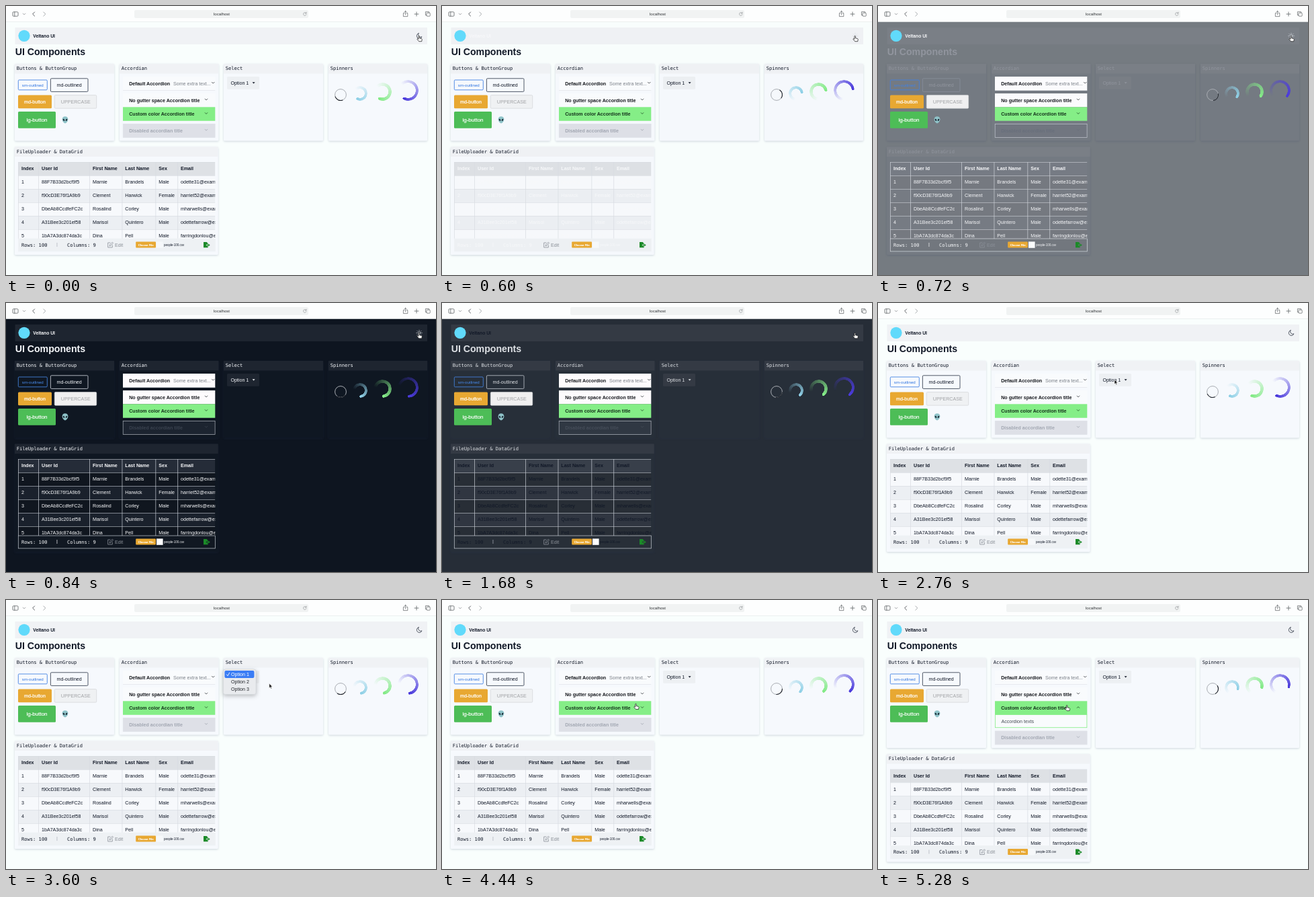
An HTML page for the animation above (5400 ms loop, 640x400 px).

```html
<!DOCTYPE html>
<html lang="en">
<head>
<meta charset="utf-8">
<title>UI Components</title>
<style>
html, body { margin: 0; width: 100%; height: 100%; overflow: hidden; }
#stage { position: relative; width: 640px; height: 400px; overflow: hidden; }
svg { position: absolute; left: 0; top: 0; font-family: "Liberation Sans", Arial, sans-serif; font-size: 7.11px; }
text { white-space: pre; }
.b { font-weight: bold; }
.mono { font-family: "DejaVu Sans Mono", monospace; font-size: 7.1px; }
.med { stroke: currentColor; stroke-width: .2px; fill: currentColor; }
.line { fill: none; stroke-linecap: round; stroke-linejoin: round; }
.card { fill: var(--card); filter: drop-shadow(0 1px 1.5px rgba(40, 55, 95, .2)); }
.spin { position: absolute; border-radius: 50%; }
</style>
</head>
<body>
<div id="stage"><svg id="svg" width="640" height="400" viewBox="0 0 640 400"></svg></div>
<script>
const LOOP = 5400, STEP = 120, GROW = 19.5;
const stage = document.getElementById('stage');
const svg = document.getElementById('svg');
const $ = id => document.getElementById(id);

// [light, dark]; the first group fades, the second switches at once
const fading = {
  page: ['#f9fefd', '#0e1520'], card: ['#f6f9fd', '#0f1722'], bar: ['#f0f2f5', '#1e2530'],
  ink: ['#111827', '#f5f7fa'], edge: ['#273142', '#d5dae2'], blue: ['#2f74e0', '#4a8df0'],
  acc: ['#f9fbfd', '#fdfbfd'], off: ['#dee0e7', '#1c2430'], offLine: ['#dee0e7', '#aeb4bd'],
  offInk: ['#a3a8b3', '#3a424f'], upper: ['#eff1f3', '#f0f0f0'], head: ['#dee1e5', '#252c38'],
  odd: ['#f7f9fc', '#10161f'], even: ['#eceff3', '#1a212c'], rule: ['#d8dbe1', '#c4c9d1'],
  foot: ['#eef1f4', '#111822'], footLine: ['#eef1f4', '#c4c9d1'], pick: ['#f6f8fa', '#ffffff'],
  sel: ['#edf0f3', '#1e2530'], track: ['#a9adb3', '#a9adb3']
};
const instant = {
  text: ['#111827', '#f7f8fa'], sep: ['#aab0b8', '#f7f8fa'], edit: ['#8b9098', '#8b9098'],
  icon: ['#303846', '#d9dde3']
};

const rect = (x, y, w, h, fill, more = '') =>
  `<rect x="${x}" y="${y}" width="${w}" height="${h}" fill="${fill}" ${more}/>`;
const text = (x, y, s, fill, more = '') => `<text x="${x}" y="${y}" fill="${fill}" ${more}>${s}</text>`;
const line = (d, stroke, w = .8, more = '') =>
  `<path class="line" d="${d}" stroke="${stroke}" stroke-width="${w}" ${more}/>`;
const chevron = (x, y, stroke, id = '') => line(`M${x - 1.8} ${y - .9}l1.8 1.8l1.8 -1.8`, stroke, .8, id);
const mid = 'text-anchor="middle"';

function toolbar() {
  const c = '#5c6064';
  return rect(0, 0, 640, 23.5, '#fdfefe') + rect(0, 23, 640, .6, '#e3e6e6') +
    rect(10, 8.8, 8, 6.4, 'none', `rx="1.2" stroke="${c}" stroke-width=".8"`) +
    line('M12.8 9v6', c) + chevron(27, 12, '#8b8f92') +
    line('M42.6 9l-3 3l3 3', c, 1) + line('M55.8 9l3 3l-3 3', '#a7abae', 1) +
    rect(191, 6, 259, 12, '#f1f3f3', 'rx="2.5"') +
    text(321, 14.2, 'localhost', '#303336', mid + ' font-size="6.1"') +
    line('M446.8 10.8a2.3 2.3 0 1 0 .2 1.9M447 9.2v1.8h-1.8', '#85898c', .6) +
    line('M593 10.6h-1.6v5h6.4v-5h-1.6M594.6 13v-5.6M592.9 9l1.7-1.7l1.7 1.7', c, .7) +
    line('M611 9v6M608 12h6', c) +
    line('M626 13.6h-1.6v-5h5.2v1.6', c, .7) + rect(626, 10.2, 5.2, 5, 'none', `rx=".8" stroke="${c}" stroke-width=".7"`);
}

const cards = [[13, 148, 'Buttons &amp; ButtonGroup'], [169, 147.5, 'Accordian'],
  [324, 148, 'Select'], [480, 147, 'Spinners']];
const card = (x, y, w, h, title, cls) =>
  `<rect class="card ${cls}" x="${x}" y="${y}" width="${w}" height="${h}" rx="1.5"/>` +
  rect(x, y, w, 14.5, 'var(--bar)') + text(x + 2.7, y + 9.4, title, 'var(--ink)', 'class="mono"');

function buttons() {
  return rect(18.3, 110, 43, 14.8, 'none', 'rx="1.3" stroke="var(--blue)" stroke-width=".8"') +
    text(39.8, 119.5, 'sm-outlined', 'var(--blue)', mid + ' font-size="6.2"') +
    rect(66.4, 107.8, 55.6, 19.6, 'none', 'rx="1.3" stroke="var(--edge)" stroke-width=".8"') +
    text(94.2, 120.1, 'md-outlined', 'var(--ink)', mid) +
    rect(18, 132.4, 50, 19.8, '#e8a832', 'rx="1.5"') +
    text(43, 144.8, 'md-button', '#fff', mid + ' class="med" color="#fff"') +
    rect(72.3, 132.6, 62.4, 19.6, 'var(--upper)', 'rx="1.3" stroke="#d3d5d7" stroke-width=".7"') +
    text(103.7, 144.8, 'UPPERCASE', '#a0a2a5', mid) +
    rect(18, 157, 56, 24.8, '#4dbd57', 'rx="1.5"') +
    text(46, 172.2, 'lg-button', '#fff', mid + ' class="med" color="#fff" font-size="8"') +
    `<path d="M88 164.2c3 0 4.4 2 4.4 4.3c0 2.8-2.8 6-4.4 6s-4.4-3.2-4.4-6c0-2.3 1.4-4.3 4.4-4.3z" fill="#8fc3c9"/>
     <g fill="#1d2b36"><ellipse cx="86" cy="169.4" rx="1.1" ry="1.7" transform="rotate(-35 86 169.4)"/>
     <ellipse cx="90" cy="169.4" rx="1.1" ry="1.7" transform="rotate(35 90 169.4)"/></g>`;
}

function accordion() {
  const dark = '#15171c';
  return rect(174, 105, 137.3, 20.6, 'var(--acc)') + rect(174, 125.2, 137.3, .6, '#dfe2e6') +
    text(183.2, 117.6, 'Default Accordion', dark, 'class="b"') +
    text(249, 117.6, 'Some extra text...', '#7b8088') + chevron(308.3, 114.2, '#33373d') +
    rect(174, 130, 137.3, 20.4, 'var(--acc)') +
    text(183.2, 142.5, 'No gutter space Accordion title', dark, 'class="b"') + chevron(298, 139, '#33373d') +
    rect(174, 150.3, 137.3, 20.5, '#85ee87') +
    text(183.2, 163, 'Custom color Accordion title', '#12301a', 'class="b"') +
    chevron(298, 159.6, '#1c4a24', 'id="arrow"') +
    `<g id="panel">${rect(174.4, 170.6, 136.5, GROW - .4, 'var(--acc)', 'id="box" stroke="#85ee87" stroke-width=".8"')}` +
    text(183.4, 182.6, 'Accordion texts', '#454b54', 'id="inner"') + '</g>' +
    `<g class="down">${rect(174.2, 175.4, 136.9, 20, 'var(--off)', 'stroke="var(--offLine)" stroke-width=".7"')}` +
    text(183.2, 187.9, 'Disabled accordian title', 'var(--offInk)', 'class="b"') +
    chevron(298, 184.3, 'var(--offInk)') + '</g>';
}

function select() {
  const item = (i, fill) => text(335, 113.2 + i * 11, 'Option ' + (i + 1), fill);
  return rect(329, 105, 48, 18.8, 'var(--sel)', 'rx="1.5"') + text(334.4, 117, 'Option 1', 'var(--ink)') +
    '<path d="M366.6 113.2h4l-2 2.3z" fill="var(--ink)"/>' +
    `<g id="menu">${rect(323.3, 103, 48.8, 37.4, '#e9ebee', 'rx="3" stroke="#c9ccd1" stroke-width=".5" style="filter:drop-shadow(0 2px 3px rgba(0,0,0,.25))"')}` +
    rect(325.4, 104.9, 44, 11, '#3a7df5', 'rx="2"') + line('M328.4 110.8l1.6 2l2.6-4.6', '#fff', .9) +
    item(0, '#fff') + item(1, '#23262b') + item(2, '#23262b') + '</g>';
}

const cols = [23, 53, 129, 177.3, 227.3, 260];
const people = [
  ['Index', 'User Id', 'First Name', 'Last Name', 'Sex', 'Email'],
  ['1', '88F7B33d2bcf9f5', 'Marnie', 'Brandels', 'Male', 'odette31@example.com'],
  ['2', 'f90cD3E76f1A9b9', 'Clement', 'Harwick', 'Female', 'harriet52@example.com'],
  ['3', 'DbeAb8CcdfeFC2c', 'Rosalind', 'Corley', 'Male', 'mharwells@example.com'],
  ['4', 'A31Bee3c201ef58', 'Marisol', 'Quintero', 'Male', 'odettefarrow@example.com'],
  ['5', '1bA7A3dc874da3c', 'Dina', 'Pell', 'Male', 'farringdonlou@example.com']
];

function table() {
  let s = '';
  people.forEach((p, r) => {
    const y = 232 + r * 20;
    s += rect(18, y, 293.4, 20, r ? `var(--${r % 2 ? 'odd' : 'even'})` : 'var(--head)');
    s += rect(18, y, 293.4, .6, 'var(--rule)');
    p.forEach((v, i) => s += text(cols[i], y + (r ? 12.4 : 12.2), v, 'var(--text)', r ? '' : 'class="b"'));
  });
  for (const x of [18, 48.2, 124.3, 172.6, 222.5, 255.4]) s += rect(x, 232, .7, 114, 'var(--rule)');
  return `<clipPath id="view"><rect x="18" y="232" width="293.4" height="114"/></clipPath><g clip-path="url(#view)">${s}</g>`;
}

function footer() {
  return rect(18.3, 346, 293, 18.9, 'var(--foot)', 'stroke="var(--footLine)" stroke-width=".7"') +
    text(23, 357.7, 'Rows: 100', 'var(--text)', 'class="mono"') + rect(75.6, 352, .7, 6, 'var(--sep)') +
    text(91, 357.7, 'Columns: 9', 'var(--text)', 'class="mono"') +
    line('M155 352h-3.3v7h6.6v-3.2M154.2 356.6l.5-1.8l3.6-3.6l1.3 1.3l-3.6 3.6z', 'var(--edit)') +
    text(162, 357.7, 'Edit', 'var(--edit)') +
    rect(193.2, 350.6, 29.8, 9, '#e8a832', 'rx="1"') +
    text(208.1, 356.6, 'Choose File', '#fff', mid + ' font-size="4.3" class="med" color="#fff"') +
    rect(224, 350.4, 9.6, 9.4, 'var(--pick)') +
    text(235, 356.6, 'people-100.csv', 'var(--text)', 'font-size="4.45"') +
    '<path d="M294 351h4.6l2 2v1.4h-2.4v2h2.4v2.9h-6.6zM299 354.9h2.3v-1.4l2.4 2l-2.4 2v-1.4h-2.3z" fill="#1b8a28"/>';
}

function header() {
  const rays = [...Array(8)].map((_, i) =>
    `<path d="M615 41.3v-1" transform="rotate(${i * 45} 615 44.5)"/>`).join('');
  return rect(13.5, 32, 613.5, 25, 'var(--bar)') + '<circle cx="27" cy="44.3" r="8.6" fill="#61dafb"/>' +
    text(40.3, 46.9, 'Veltano UI', 'var(--text)', 'class="b" font-size="6.75"') +
    line('M614 40.6a4 4 0 1 0 5 5.2a3.8 3.8 0 0 1-5-5.2z', 'var(--icon)', .8, 'id="moon"') +
    `<g id="sun" class="line" stroke="var(--icon)" stroke-width=".7"><circle cx="615" cy="44.5" r="1.8"/>${rays}</g>` +
    text(13.7, 73, 'UI Components', 'var(--ink)', 'class="b" font-size="14.15"');
}

const pointers = `<g id="hand"><path d="M-.7 .6c0-1 1.5-1 1.5 0v2.6l2.9.7c.8.2 1 .7.9 1.4l-.5 2.8h-4l-2.6-3c-.5-.8.4-1.5 1-1l.8.7z"
  fill="#fff" stroke="#111" stroke-width=".7" stroke-linejoin="round"/></g>
  <path id="arrow-tip" d="M0 0v6.6l1.5-1.4l1 2.3l1.1-.5l-1-2.2h2z" fill="#111" stroke="#fff" stroke-width=".5"/>`;

svg.innerHTML = rect(0, 23, 640, 377, 'var(--page)') + toolbar() + header() +
  cards.map(([x, w, t]) => card(x, 86, w, 114.5, t, 'tall')).join('') +
  buttons() + accordion() +
  `<g class="down">${card(13, 209.5, 302.7, 160.5, 'FileUploader &amp; DataGrid', '')}${table()}${footer()}</g>` +
  select() + `<circle cx="498" cy="132" r="8.4" fill="none" stroke="var(--track)" stroke-width="1"/>` +
  line('M504 126a8.4 8.4 0 0 1 0 12', '#20242b', 1.1, 'id="ring"') +
  `<g id="cursor">${pointers}</g>`;

// ring with a round head and a fading tail
const spinners = [[527, 130, 11, 4, '#8fd0e6'], [560.5, 127.5, 13.5, 4.6, '#84ea88'], [598.5, 125, 15.5, 4, '#4b3bdc']]
  .map(([x, y, r, w, c]) => {
    const d = document.createElement('div');
    d.className = 'spin';
    const hole = `radial-gradient(farthest-side, #0000 calc(100% - ${w + .4}px), #000 calc(100% - ${w}px))`;
    d.style.cssText = `left:${x - r}px;top:${y - r}px;width:${2 * r}px;height:${2 * r}px;` +
      `background:radial-gradient(farthest-side, ${c} 94%, #0000) top/${w}px ${w}px no-repeat, conic-gradient(#0000 30%, ${c});` +
      `-webkit-mask:${hole};mask:${hole}`;
    stage.appendChild(d);
    return d;
  });

const clamp = v => Math.max(0, Math.min(1, v));
const ramp = (t, a, b) => clamp((t - a) / (b - a));
const ease = u => u * u * (3 - 2 * u);
const mix = (a, b, u) => 'rgb(' + [1, 3, 5].map(i => {
  const p = parseInt(a.substr(i, 2), 16), q = parseInt(b.substr(i, 2), 16);
  return Math.round(p + (q - p) * u);
}) + ')';

// time, x, y of the pointer tip
const path = [[0, 614.6, 44.6], [1950, 614.6, 44.6], [2640, 352, 114], [3120, 352, 114],
  [3500, 391.8, 124.2], [3800, 391.8, 124.2], [4560, 281, 156.6], [LOOP, 281, 156.6]];
function pointer(t) {
  const i = path.findIndex(p => p[0] > t), [t0, x0, y0] = path[i - 1], [t1, x1, y1] = path[i];
  const u = ease((t - t0) / (t1 - t0));
  return [x0 + (x1 - x0) * u, y0 + (y1 - y0) * u];
}

const show = (id, on) => $(id).style.display = on ? '' : 'none';

function render(t) {
  const m = ease(ramp(t, 590, 830)) - ease(ramp(t, 1630, 1880));
  const dark = t >= 600 && t < 1680;
  for (const k in fading) svg.style.setProperty('--' + k, mix(...fading[k], m));
  for (const k in instant) svg.style.setProperty('--' + k, instant[k][+dark]);
  show('sun', dark);
  show('moon', !dark);

  const open = ease(ramp(t, 4830, 5140)), dy = open * GROW;
  document.querySelectorAll('.tall').forEach(c => c.setAttribute('height', 114.5 + dy));
  document.querySelectorAll('.down').forEach(g => g.setAttribute('transform', `translate(0 ${dy})`));
  show('panel', open > 0);
  $('box').setAttribute('height', Math.max(0, dy - .4));
  $('inner').setAttribute('opacity', ramp(open, .6, 1));
  $('arrow').setAttribute('transform', `rotate(${180 * open} 298 159.6)`);
  show('menu', t >= 2880 && t < 3720);

  const [x, y] = pointer(t);
  const hand = t < 2100 || (x < 311 && y > 150);
  $('cursor').setAttribute('transform', `translate(${x} ${y})`);
  show('hand', hand);
  show('arrow-tip', !hand);

  const turn = 205 + t * .39;
  spinners.forEach(s => s.style.transform = `rotate(${turn}deg)`);
  $('ring').setAttribute('transform', `rotate(${turn - 90} 498 132)`);
}

function tick() {
  const t = performance.now() % LOOP;
  render(Math.floor(t / STEP) * STEP);
  requestAnimationFrame(tick);
}
tick();
</script>
</body>
</html>
```
